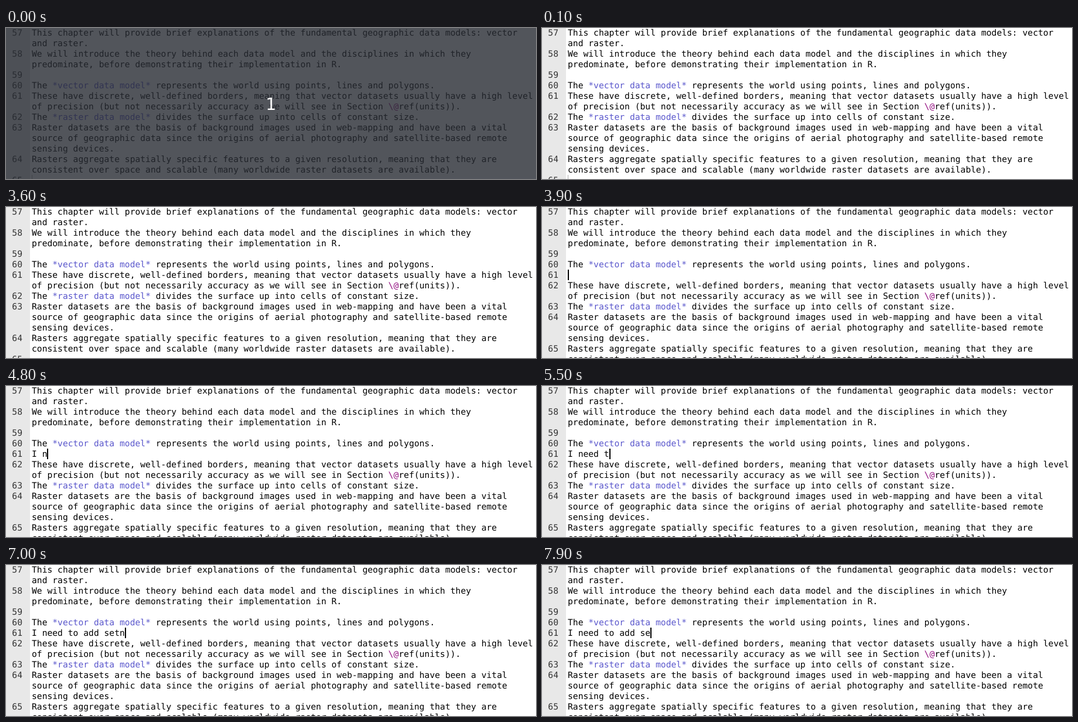
Animation of 905x258 px, one loop 8 s. Source, as an HTML page:

```html
<!DOCTYPE html>
<html lang="en">
<head>
<meta charset="utf-8">
<title>Text editor typing</title>
<style>
  html, body { margin: 0; width: 100%; height: 100%; overflow: hidden; background: #fff; }
  #stage { position: relative; width: 905px; height: 258px; overflow: hidden; background: #fff; }
  #gutter, #text {
    position: absolute; top: 0; margin: 0; height: 270px; white-space: pre;
    font: 11pt/18px "DejaVu Sans Mono", monospace;
    text-rendering: geometricPrecision; font-variant-ligatures: none;
  }
  #gutter { left: 0; width: 28px; padding-right: 13px; text-align: right; background: #e8e8e8; color: #333; }
  #text { left: 44px; color: #000; }
  .em { color: #5a57cc; }
  .esc { color: #930f80; }
  #caret { position: absolute; height: 18px; }
  #shade { position: absolute; inset: 0; background: rgba(39, 43, 51, .8); }
  #shade span {
    position: absolute; top: 2px; left: 0; width: 905px; text-align: center;
    font: 28px/258px "DejaVu Sans", sans-serif; color: #fff;
  }
</style>
</head>
<body>
<div id="stage">
  <pre id="gutter"></pre>
  <pre id="text"></pre>
  <div id="caret"></div>
  <div id="shade"><span>1</span></div>
</div>
<script>
const LOOP = 8000, ROW = 18, LEFT = 44, CHAR = 8.82;
const FIRST_LINE = 57, NEW_LINE = 4, NEW_ROW = 6;

const paragraphs = [
  "This chapter will provide brief explanations of the fundamental geographic data models: vector\nand raster.",
  "We will introduce the theory behind each data model and the disciplines in which they\npredominate, before demonstrating their implementation in R.",
  "",
  "The *vector data model* represents the world using points, lines and polygons.",
  "These have discrete, well-defined borders, meaning that vector datasets usually have a high level\nof precision (but not necessarily accuracy as we will see in Section \\@ref(units)).",
  "The *raster data model* divides the surface up into cells of constant size.",
  "Raster datasets are the basis of background images used in web-mapping and have been a vital\nsource of geographic data since the origins of aerial photography and satellite-based remote\nsensing devices.",
  "Rasters aggregate spatially specific features to a given resolution, meaning that they are\nconsistent over space and scalable (many worldwide raster datasets are available).",
  ""
];

// [time, characters on the new line]; the typo is then deleted
const phrase = "I need to add setne";
const keys = [
  [3900, 0], [4500, 1], [4600, 2], [4800, 3], [5000, 5], [5200, 6], [5300, 7],
  [5500, 8], [5600, 9], [5800, 10], [6000, 11], [6300, 12], [6400, 13], [6500, 14],
  [6600, 15], [6900, 16], [7000, 18], [7200, 19], [7500, 18], [7600, 17], [7900, 16]
];

const el = id => document.getElementById(id);
const gutter = el("gutter"), text = el("text"), caret = el("caret"), shade = el("shade");

const highlight = s => s
  .replace(/\*[^*]+\*/g, '<span class="em">$&</span>')
  .replace(/\\@/g, '<span class="esc">$&</span>');

function showLines(lines) {
  text.innerHTML = highlight(lines.join("\n"));
  gutter.textContent = lines
    .map((line, i) => FIRST_LINE + i + line.replace(/[^\n]/g, ""))
    .join("\n");
}

function placeCaret(row, column, width = 2, color = "#000") {
  caret.style.left = Math.round(LEFT + column * CHAR) + "px";
  caret.style.top = row * ROW - 1 + "px";
  caret.style.width = width + "px";
  caret.style.background = color;
}

let shown = null;

function render(t) {
  const typed = keys.reduce((n, [time, count]) => t >= time ? count : n, -1);
  if (typed !== shown) {
    shown = typed;
    const lines = [...paragraphs];
    if (typed >= 0) lines.splice(NEW_LINE, 0, phrase.slice(0, typed));
    showLines(lines);
  }

  if (t < 2900) placeCaret(14, 0, 1, "#aaa");
  else if (typed < 0) placeCaret(NEW_ROW - 1, paragraphs[3].length);
  else placeCaret(NEW_ROW, typed);

  const blinkedOff = (t >= 3600 && t < 3900) || (t >= 4400 && t < 4500);
  caret.style.visibility = blinkedOff ? "hidden" : "visible";
  shade.style.visibility = t < 100 ? "visible" : "hidden";
}

const start = performance.now();
function tick() {
  render((performance.now() - start) % LOOP);
  requestAnimationFrame(tick);
}
tick();
</script>
</body>
</html>
```
